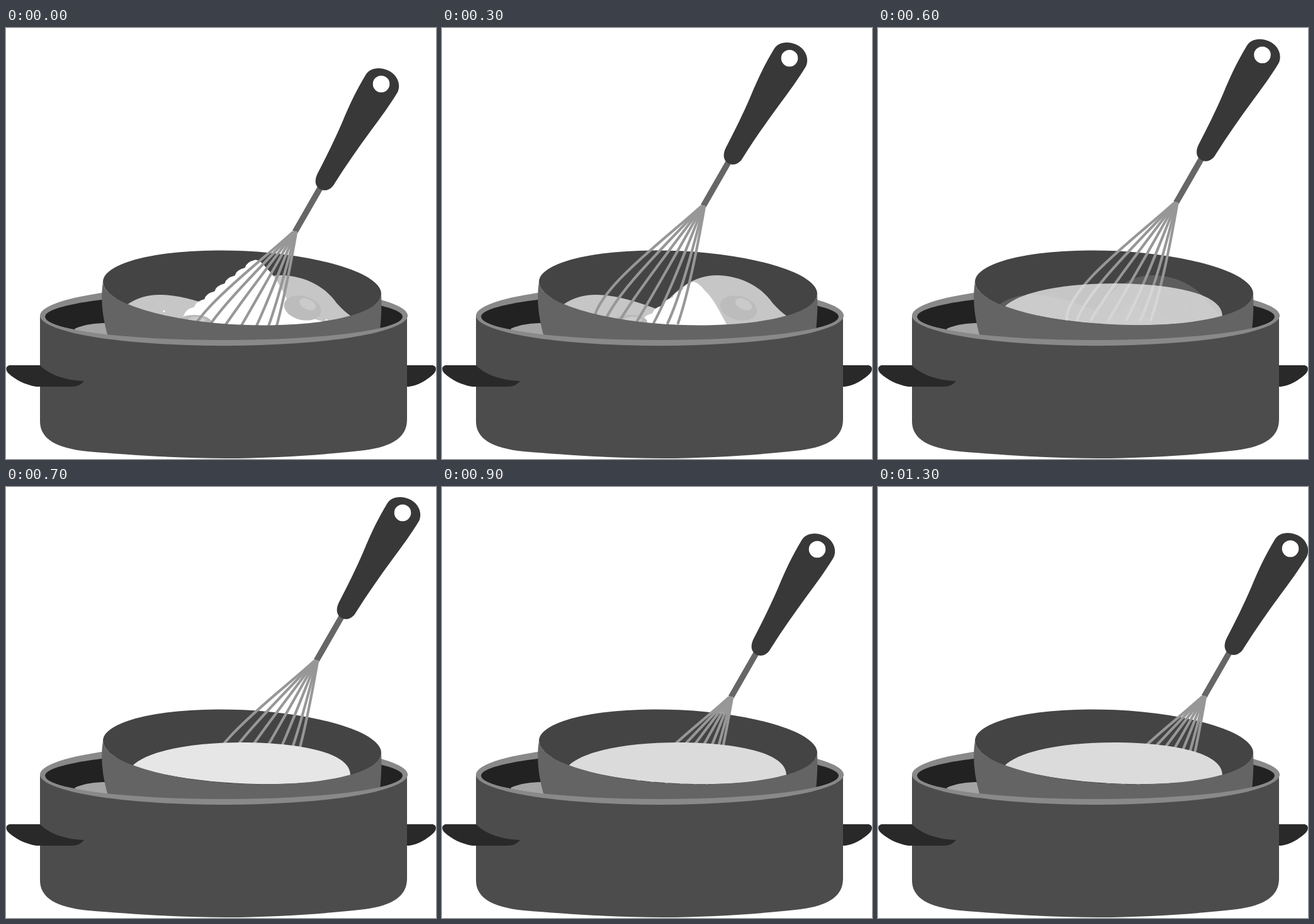
Recreate the animation shown at these times as an HTML page. Size 683x685 px, loop 1.4 s.

```html
<!DOCTYPE html>
<html lang="en">
<head>
<meta charset="utf-8">
<title>Whisking over a pot</title>
<style>
html, body { margin: 0; width: 100%; height: 100%; overflow: hidden; background: #fff; }
svg { display: block; width: 100%; height: 100%; }
</style>
</head>
<body>
<svg viewBox="0 0 683 685">
  <!-- pot, back -->
  <ellipse cx="346" cy="457" rx="292" ry="48" fill="#898989"/>
  <ellipse cx="346" cy="459" rx="284" ry="37" fill="#222"/>
  <path fill="#a4a4a4" d="M109 478C125 471 140 469 162 469V495L112 484Z"/>

  <!-- bowl, inside -->
  <ellipse cx="375" cy="413" rx="221.2" ry="58.7" transform="rotate(2.63 375 413)" fill="#444"/>

  <g id="eggs">
    <path fill="#c6c6c6" d="M192 440C208 428 228 423 248 424C280 425 312 436 345 448L390 480H240Z"/>
    <path fill="#c6c6c6" d="M340 455C370 415 400 393 437 393C480 394 510 415 525 437C534 447 541 453 548 458L540 480H340Z"/>
    <g id="mound" fill="#fff">
      <path id="heap"/>
      <circle cx="251" cy="450" r="1.5"/>
      <circle cx="509" cy="464" r="1.5"/>
    </g>
    <ellipse cx="299" cy="467" rx="27" ry="11" fill="#b9b9b9"/>
    <ellipse cx="303" cy="464" rx="14" ry="5" fill="#cacaca"/>
    <ellipse cx="471" cy="445" rx="30" ry="19" fill="#bcbcbc" transform="rotate(14 471 445)"/>
    <ellipse cx="479" cy="439" rx="14" ry="8" fill="#cacaca" transform="rotate(26 479 439)"/>
  </g>

  <!-- whisk, placed by the centre of the hole in its grip -->
  <g id="whisk">
    <path stroke="#666" stroke-width="9.5" d="M-94 160L-137 235"/>
    <g id="wires" fill="none" stroke="#979797" stroke-width="4.2" stroke-linecap="round" transform="translate(-138 236)"/>
    <path fill="#383838" fill-rule="evenodd" d="M-25 -14C-19 -25 -4 -28 10 -22C25 -16 32 0 26 13C16 30 -2 55 -17 75C-36 101 -56 129 -74 158C-79 167 -87 171 -95 168C-105 164 -107 154 -101 142C-88 117 -74 89 -62 61C-51 34 -39 9 -25 -14ZM-13.3 0A13.3 13.3 0 0 0 13.3 0A13.3 13.3 0 0 0 -13.3 0Z"/>
  </g>

  <path id="cream" d="M200 444C225 418 300 406 375 406C455 406 547 419 547 458C510 470 450 473 400 472C330 471 255 461 200 444Z"/>

  <!-- bowl, outside -->
  <path fill="#646464" d="M154 404A221.2 58.7 2.63 0 0 596 422C597 445 596 465 592 500H165C155 470 149 435 154 404Z"/>

  <!-- pot, front -->
  <path fill="#4c4c4c" d="M54 457A292 46 0 0 0 637 457V622C637 650 615 665 570 671C520 677 430 684 350 684C270 684 190 678 130 673C80 668 54 653 54 625Z"/>
  <path fill="#898989" d="M54 457A292 48 0 0 0 638 457L630 459A284 37 0 0 1 62 459Z"/>
  <path fill="#292929" d="M7 536H54C70 552 95 560 124 561C119 567 113 570 105 570H48C30 567 15 559 4 549C-2 543 0 536 7 536Z"/>
  <path fill="#292929" d="M637 536H676C684 536 685 544 679 550C668 560 655 568 640 570H637Z"/>
</svg>
<script>
const LOOP = 1400, STEP = 100, WIRES = 7;
const get = id => document.getElementById(id);
const [eggs, mound, heap, whisk, wires, cream] =
  ['eggs', 'mound', 'heap', 'whisk', 'wires', 'cream'].map(get);

// the further out a wire sits, the more it bows
function wire(i) {
  const out = 1 - i / (WIRES - 1);
  const near = -6 - 54 * out ** 1.2;
  const far = -22 - 152 * out ** 1.5;
  const end = -39 - 134 * (out - Math.sin(2 * Math.PI * out) / 20);
  return `<path d="M${i - 3} 0C${near} 52 ${far} 135 ${end} 185"/>`;
}
wires.innerHTML = Array.from({ length: WIRES }, (_, i) => wire(i)).join('');

// a slope of equal bumps, then a smooth far side
heap.setAttribute('d', 'M270 520V472L283 456' + 'q2 -9 16.1 -12.5'.repeat(7) +
  'C404 368 412 380 420 388C432 402 440 420 447 432C455 450 480 462 512 468V520Z');

// turning points of the stirring
const route = [
  { t: 0, x: 596, y: 89 }, { t: 100, x: 572, y: 37 },
  { t: 300, x: 552, y: 48 }, { t: 700, x: 630, y: 41 },
  { t: 900, x: 596, y: 99 }, { t: 1100, x: 480, y: 107 },
  { t: 1300, x: 655, y: 98 }
];

const progress = (t, from, to) => Math.min(1, Math.max(0, (t - from) / (to - from)));
const mix = (a, b, k) => a + (b - a) * k;
const move = (el, x, y) => el.setAttribute('transform', `translate(${x} ${y})`);

function draw(now) {
  const t = Math.floor((now % LOOP) / STEP) * STEP;

  const next = Math.max(1, route.findIndex(p => p.t >= t));
  const a = route[next - 1], b = route[next];
  const k = progress(t, a.t, b.t);
  move(whisk, mix(a.x, b.x, k), mix(a.y, b.y, k));

  const sunk = progress(t, 0, 600);
  move(mound, 6 * sunk, 70 * sunk);

  const blend = progress(t, 500, 625);
  const grey = Math.round(mix(230, 219, progress(t, 700, 900)));
  eggs.setAttribute('opacity', 1 - blend);
  cream.setAttribute('opacity', blend);
  cream.setAttribute('fill', `rgb(${grey},${grey},${grey})`);
}

const start = performance.now();
function tick() {
  draw(performance.now() - start);
  requestAnimationFrame(tick);
}
tick();
</script>
</body>
</html>
```
